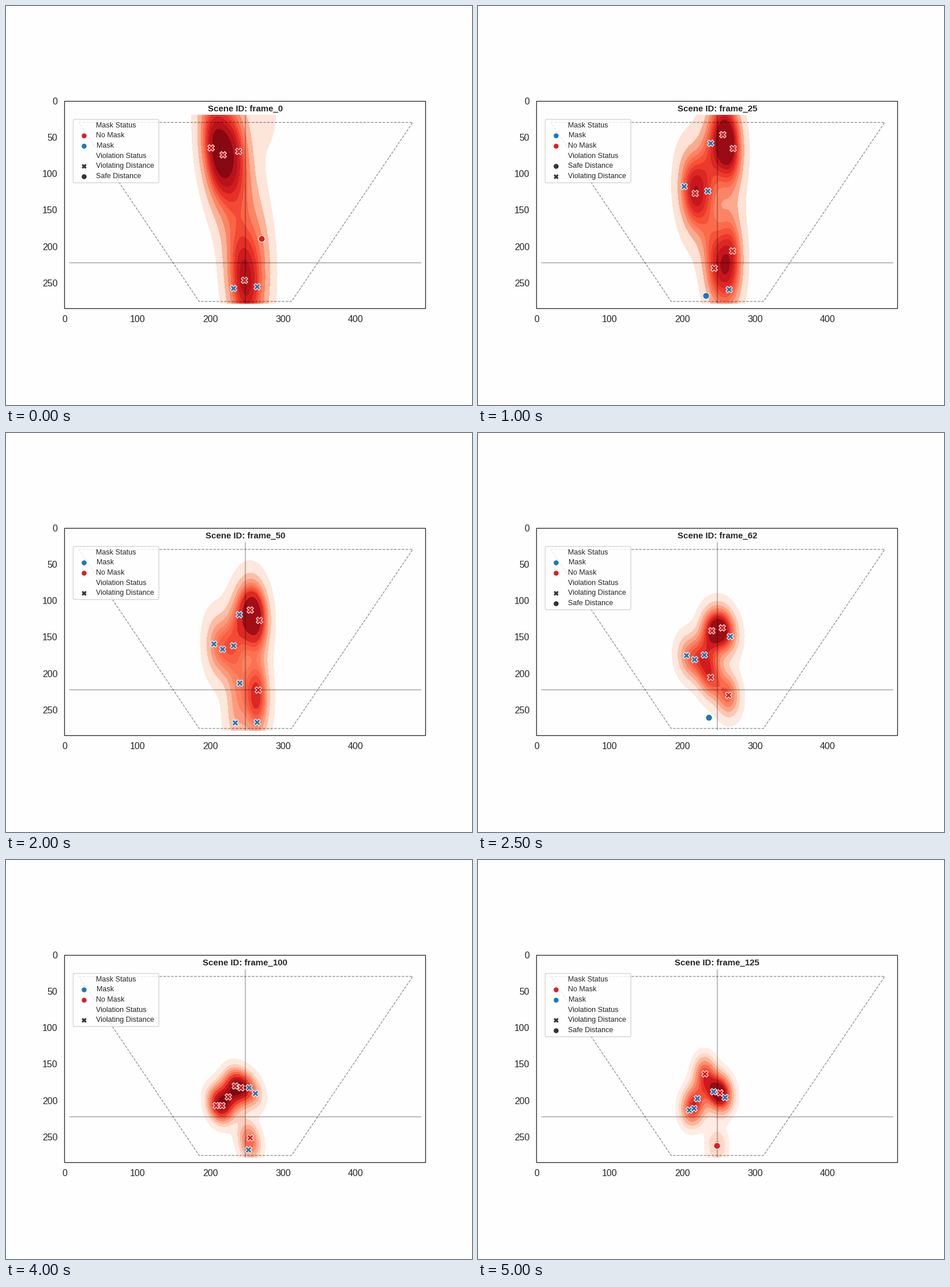
Write a matplotlib script that moves like this. It is 808 px wide and 693 px high and loops after 5.5 s.

```python
import numpy as np
import matplotlib.pyplot as plt
from matplotlib.animation import FuncAnimation
from matplotlib.patches import FancyBboxPatch, Rectangle

plt.rcParams["font.family"] = "Liberation Sans"

W, H, DPI = 808, 693, 100
LEFT, RIGHT, TOP, BOTTOM = 101, 727, 165, 525
INK, RED, BLUE = "#262626", "#d92124", "#1d78bb"
Y_CLIP = (20, 278)
BW_ADJUST = 0.85
SCENES = 11
LAST = 125

# N / M: without / with mask, too close; lower case: at a safe distance
RISK = {"N": 2, "n": 1, "M": 1, "m": 0}

# Each person: start, end, x and y easing, sway (size, period), status per scene
PEOPLE = [
    ((238, -24), (243, 188), 1, 2.2, (0, 1), "-MMMMNNNNNM"),
    ((257, -45), (252, 189), 1, 2.2, (0, 1), "-NNNNNMMMNN"),
    ((273, -18), (259, 196), 1, 2.2, (0, 1), "nNNNNMMMMMM"),
    ((201, 64), (210, 213), 1, 2, (0, 1), "NNMMMMMMNMM"),
    ((218, 74), (216, 211), 1, 2.2, (0, 1), "NMNNMMMMNNM"),
    ((239, 69), (221, 197), 1, 2.5, (0, 1), "NMMMMMMNNMM"),
    ((247, 246), (231, 163), 1, 1, (0, 1), "NNNNMNNNNNN"),
    ((271, 189), (248, 262), 1.6, 1.2, (0, 1), "nnNNNNNNNNn"),
    ((232, 264), (272, 264), 3, 1, (7, 75), "MMmMMmMMM--"),
    ((264, 263), (264, 263), 1, 1, (8, 21.5), "MMMMM------"),
]
LEGENDS = ["NM XO", "MN XO", "MN OX", "NM X", "MN X", "MN XO",
           "MN X", "MN X", "MN X", "NM X", "NM XO"]


def px(x):
    return 101.6 + np.asarray(x) * 1.261


def py(y):
    return 164.7 + np.asarray(y) * 1.264


def scene_id(i):
    return int(LAST * i / (SCENES - 1))


def detections(i):
    """Status letters and positions of everyone present in scene i."""
    s = scene_id(i)
    u = s / LAST
    status, pts = [], []
    for (x0, y0), (x1, y1), kx, ky, (sway, period), states in PEOPLE:
        if states[i] == "-":
            continue
        x = x0 + (x1 - x0) * u ** kx
        y = y0 + (y1 - y0) * (1 - (1 - u) ** ky)
        pts.append((x, y - sway * np.cos(2 * np.pi * s / period)))
        status.append(states[i])
    return status, np.array(pts)


def density(pts, w):
    """Weighted Gaussian KDE with Scott's rule, on a clipped grid."""
    w = w / w.sum()
    neff = 1 / (w ** 2).sum()
    cov = np.cov(pts.T, aweights=w) * (neff ** (-1 / 6) * BW_ADJUST) ** 2
    cut = 3 * np.sqrt(np.diag(cov))
    lo, hi = pts.min(axis=0) - cut, pts.max(axis=0) + cut
    gx = np.linspace(lo[0], hi[0], 200)
    gy = np.linspace(max(lo[1], Y_CLIP[0]), min(hi[1], Y_CLIP[1]), 200)
    inv = np.linalg.inv(cov)
    z = np.zeros((200, 200))
    for (x, y), k in zip(pts, w):
        dx, dy = gx[None, :] - x, gy[:, None] - y
        q = inv[0, 0] * dx ** 2 + 2 * inv[0, 1] * dx * dy + inv[1, 1] * dy ** 2
        z += k * np.exp(-q / 2)
    return gx, gy, z


def mass_levels(z):
    """Contour levels that enclose equal shares of the total mass."""
    v = np.sort(z.ravel())[::-1]
    share = np.cumsum(v) / v.sum()
    idx = np.searchsorted(share, 1 - np.linspace(0.05, 1, 10))
    return v[np.minimum(idx, len(v) - 1)]


fig = plt.figure(figsize=(W / DPI, H / DPI), dpi=DPI, facecolor="#fefefe")
ax = fig.add_axes([0, 0, 1, 1])
ax.set_xlim(0, W)
ax.set_ylim(H, 0)
ax.axis("off")


def text(x, y, s, size, **kw):
    """Text with its size in pixels, standing on the baseline y."""
    return ax.text(x, y, s, fontsize=size * 72 / DPI, color=INK, **kw)


def draw_stage():
    ax.add_patch(Rectangle((LEFT, TOP), RIGHT - LEFT, BOTTOM - TOP, fill=False,
                           ec=INK, lw=0.95, zorder=8))
    for v in range(0, 500, 100):
        text(px(v) + 0.4, 548.7, str(v), 16, ha="center")
    for v in range(0, 300, 50):
        text(89.5, py(v) + 6, str(v), 16, ha="right")
    line = dict(color="black", alpha=0.25, lw=1.5, solid_capstyle="butt", zorder=3)
    ax.plot(px([6.5, 490.5]), py([222.5, 222.5]), **line)
    ax.plot(px([248.3, 248.3]), py(Y_CLIP), **line)
    ax.plot(px([19.5, 478.7, 312, 185, 19.5]), py([29.7, 29.7, 275.7, 275.7, 29.7]),
            color="black", alpha=0.42, lw=1, ls=(0, (3.2, 1.6)), zorder=3)


def draw_legend(order):
    masks, kinds = order.split()
    rows = [("Mask Status", None, None)]
    rows += [("No Mask", "o", RED) if c == "N" else ("Mask", "o", BLUE) for c in masks]
    rows += [("Violation Status", None, None)]
    rows += [("Violating Distance", "X", "#333333") if c == "X"
             else ("Safe Distance", "o", "#333333") for c in kinds]
    h = 17.7 * len(rows) + 3.8
    out = [ax.add_patch(FancyBboxPatch(
        (119, 199.5), 143.5, h - 5, boxstyle="round,pad=2.5,rounding_size=2.5",
        fc=(1, 1, 1, 0.8), ec=(0.8, 0.8, 0.8, 0.9), lw=0.9, zorder=5))]
    for i, (label, marker, color) in enumerate(rows):
        y = 206.5 + 17.7 * i
        out.append(text(156.5, y + 4.1, label, 12.5, zorder=6))
        if marker:
            out.append(ax.scatter(134.5, y + 0.8, s=38, marker=marker, c=color,
                                  linewidths=0, zorder=6))
    return out


shown = []


def update(i):
    while shown:
        shown.pop().remove()
    status, pts = detections(i)
    gx, gy, z = density(pts, np.array([RISK[c] for c in status], float))
    shown.append(ax.contourf(px(gx), py(gy), z, levels=mass_levels(z),
                             cmap="Reds", zorder=1))
    for (x, y), c in zip(pts, status):
        if y < Y_CLIP[0]:
            continue
        shown.append(ax.scatter(px(x), py(y), s=68, marker="X" if c.isupper() else "o",
                                c=RED if c in "Nn" else BLUE, edgecolors="white",
                                linewidths=0.8, zorder=4))
    shown.append(text(414.8, 182.4, f"Scene ID: frame_{scene_id(i)}", 15,
                      weight="bold", ha="center", zorder=6))
    shown.extend(draw_legend(LEGENDS[i]))
    return shown


draw_stage()
anim = FuncAnimation(fig, update, frames=SCENES, interval=500, init_func=lambda: [],
                     repeat=True, repeat_delay=0, blit=False)
plt.show()
```
